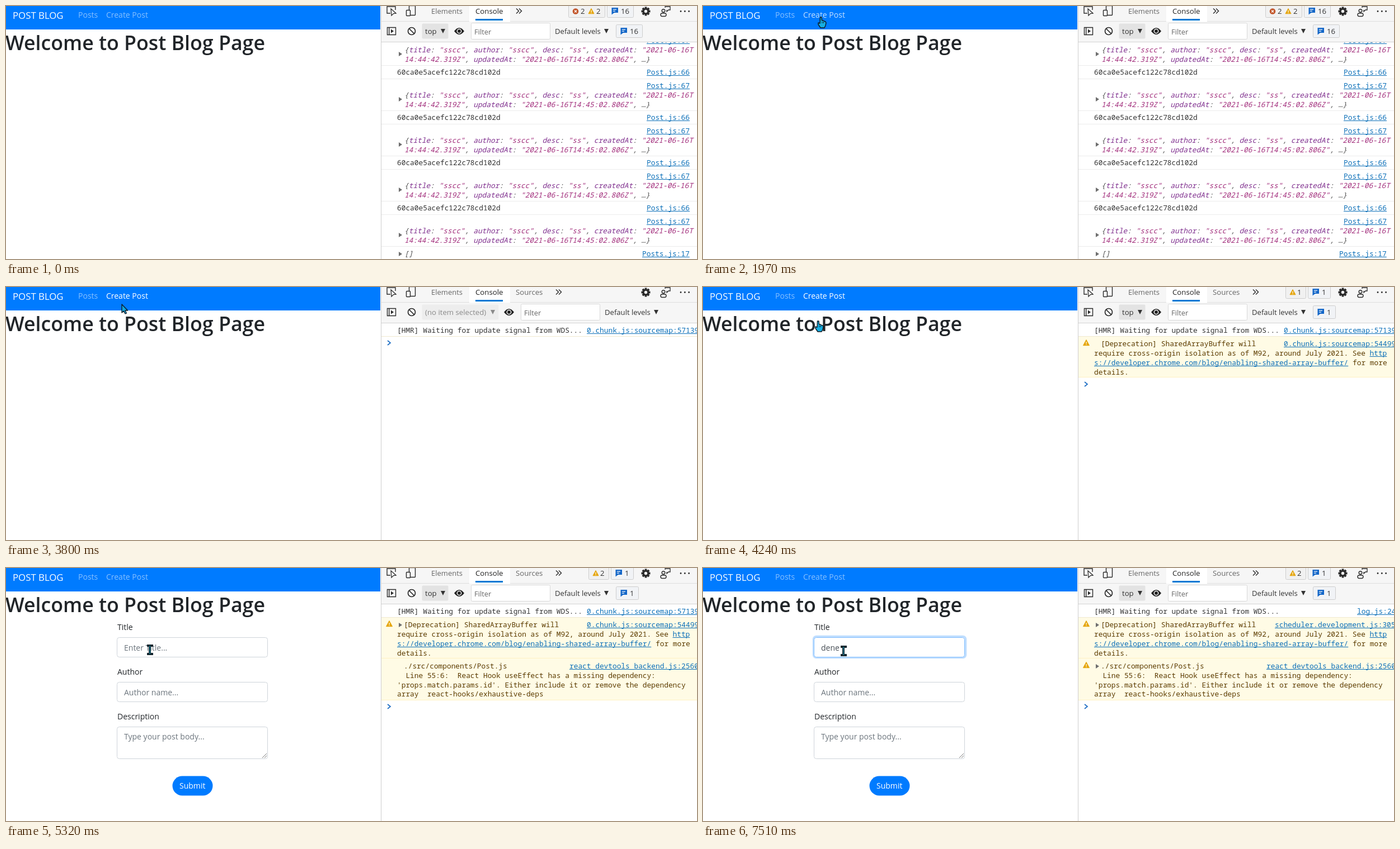
Recreate the animation shown at these times as an HTML page with a canvas. Size 1235x453 px, loop 8 s.

```html
<!DOCTYPE html>
<html lang="en">
<head>
<meta charset="utf-8">
<title>Post Blog</title>
<style>
html, body { margin: 0; width: 100%; height: 100%; overflow: hidden; background: #fff; }
canvas { display: block; width: 1235px; height: 453px; }
</style>
</head>
<body>
<canvas id="stage" width="1235" height="453"></canvas>
<script>
const ctx = document.getElementById('stage').getContext('2d');
const LOOP = 8000, TICK = 68;
const SANS = '"Open Sans", "Noto Sans", sans-serif';
const UI = '13.2px ' + SANS;
const PAGE = '14px ' + SANS;
const MONO = '12.83px "Noto Sans Mono", "DejaVu Sans Mono", monospace';
const CHAR = 7.7;
const LINK = '#0b6fb8', BROWN = '#5c3c00', BLUE = '#007bff';

// Pointer path: time, x, y
const PATH = [
  [200, 1018, 317], [480, 640, 210], [812, 104, 58], [948, 119, 33],
  [1084, 130, 27], [1220, 141, 18], [1490, 141, 18], [1968, 211, 20],
  [2990, 211, 18], [3670, 211, 19], [3800, 203, 42], [4030, 203, 44],
  [4240, 206, 64], [4440, 214, 74], [4710, 248, 104], [4980, 250, 112],
  [5320, 257, 148], [5400, 252, 148], [6840, 252, 148], [6980, 251, 148]
];

const clamp = v => Math.max(0, Math.min(1, v));

function pointer(time) {
  const t = 200 + Math.floor((time - 198) / TICK) * TICK;
  const i = PATH.findIndex(p => p[0] > t);
  if (i < 0) return PATH[PATH.length - 1].slice(1);
  if (i === 0) return PATH[0].slice(1);
  const [a, ax, ay] = PATH[i - 1], [b, bx, by] = PATH[i];
  const k = (t - a) / (b - a);
  return [Math.round(ax + (bx - ax) * k), Math.round(ay + (by - ay) * k)];
}

function text(s, x, y, color, font = UI) {
  ctx.font = font;
  ctx.fillStyle = color;
  ctx.fillText(s, x, y);
}

function rect(x, y, w, h, color) {
  ctx.fillStyle = color;
  ctx.fillRect(x, y, w, h);
}

function box(x, y, w, h, r, fill, border, line = 1) {
  ctx.beginPath();
  ctx.roundRect(x + .5, y + .5, w - 1, h - 1, r);
  if (fill) { ctx.fillStyle = fill; ctx.fill(); }
  if (border) { ctx.strokeStyle = border; ctx.lineWidth = line; ctx.stroke(); }
}

function poly(x, y, points, fill, stroke, width = 1, open = false) {
  ctx.beginPath();
  for (let i = 0; i < points.length; i += 2) ctx.lineTo(x + points[i], y + points[i + 1]);
  if (!open) ctx.closePath();
  if (fill) { ctx.fillStyle = fill; ctx.fill(); }
  if (stroke) { ctx.strokeStyle = stroke; ctx.lineWidth = width; ctx.stroke(); }
}

function circle(x, y, r, fill, stroke, width = 1.5) {
  ctx.beginPath();
  ctx.arc(x, y, r, 0, Math.PI * 2);
  if (fill) { ctx.fillStyle = fill; ctx.fill(); }
  if (stroke) { ctx.strokeStyle = stroke; ctx.lineWidth = width; ctx.stroke(); }
}

const down = (x, y, color) => poly(x, y, [-4, -4, 4, -4, 0, 4], color);
const expand = y => poly(702, y, [0, -4, 6, 0, 0, 4], '#6e6e6e');

function link(s, x, y) {
  text(s, x, y, LINK, MONO);
  rect(x, y + 1, s.length * CHAR, 1, LINK);
}

function warnIcon(x, y, r) {
  poly(x, y, [0, -r, r, r * .85, -r, r * .85], '#e5a50a', '#e5a50a');
  rect(x - .6, y - r * .35, 1.3, r * .6, '#fff');
  rect(x - .6, y + r * .42, 1.3, 1.2, '#fff');
}

function chatPill(x, y, h, count) {
  box(x, y, count > 9 ? 48 : 41, h, 2, '#f1f3f6', '#cdcdcd');
  const cy = y + h / 2 - 1;
  poly(x + 14, cy, [-5.5, -5, 6, -5, 6, 4, -1, 4, -5.5, 7.5], '#1467c8');
  rect(x + 11, cy - 2.5, 6, 1.2, '#fff');
  rect(x + 11, cy + .5, 4, 1.2, '#fff');
  text(count, x + 25, cy + 5.5, '#333');
}

function page(time, hover) {
  rect(0, 0, 670, 453, '#fff');
  rect(0, 0, 669, 42, BLUE);
  const focused = time >= 2440 && time < 4440;
  const shade = on => `rgba(255,255,255,${on ? .76 : .52})`;
  text('POST BLOG', 12, 23, '#fff', '16.8px ' + SANS);
  text('Posts', 129, 21, shade(hover === 1), PAGE);
  text('Create Post', 179, 21, focused ? '#fff' : shade(hover === 2), PAGE);
  text('Welcome to Post Blog Page', -1, 79, '#212529', '600 35.7px ' + SANS);
  if (time >= 4440) form(time);
}

function form(time) {
  const ink = '#212529', muted = '#6c757d', edge = '#ced4da';
  const typed = 'dene'.slice(0, [6230, 6370, 6840, 6980].filter(t => time >= t).length);
  const glow = clamp((time - 5670) / 210);
  ['Title', 'Author', 'Description'].forEach((s, i) => text(s, 199, 111 + i * 80, ink, PAGE));
  if (glow) box(197, 122, 273, 39, 5, null, `rgba(0,123,255,${.25 * glow})`, 3.5);
  const mix = (a, b) => Math.round(a + (b - a) * glow);
  box(198, 124, 270, 36, 4, '#fff', `rgb(${mix(206, 128)},${mix(212, 189)},${mix(218, 255)})`);
  box(198, 204, 270, 36, 4, '#fff', edge);
  box(198, 284, 270, 58, 4, '#fff', edge);
  text(typed || 'Enter Title...', 211, 148, typed ? '#495057' : muted, PAGE);
  const caretOn = (time >= 5670 && time < 6170) || (time >= 6230 && time < 7510);
  if (caretOn) {
    ctx.font = PAGE;
    rect(211 + Math.round(ctx.measureText(typed).width), 134, 1, 17, '#495057');
  }
  text('Author name...', 211, 228, muted, PAGE);
  text('Type your post body...', 211, 307, muted, PAGE);
  poly(458, 332, [0, 8, 8, 0], null, '#777', 1, true);
  poly(458, 332, [4, 8, 8, 4], null, '#777', 1, true);
  box(297, 372, 73, 36, 17.5, BLUE);
  text('Submit', 310, 395, '#fff', PAGE);
}

function tabIcons() {
  const ink = '#2b2b2b';
  poly(681, 1, [6, 12, 0, 12, 0, 0, 15, 0, 15, 6], null, ink, 1.4, true);
  poly(688, 5, [0, 0, 9, 8, 4.5, 8.5, 1, 12], '#fff', ink, 1.3);
  box(720, -1, 12, 18, 1, null, ink, 1.4);
  box(715, 7, 8, 11, 1, '#f6f6f6', ink, 1.4);
  for (let i = 0; i < 8; i++) {
    ctx.save();
    ctx.translate(1143.5, 9.5);
    ctx.rotate(i * Math.PI / 4);
    rect(-1.9, -8, 3.8, 4, ink);
    ctx.restore();
  }
  circle(1143.5, 9.5, 4.4, null, ink, 3.4);
  circle(1175, 8.5, 2.8, null, ink, 1.4);
  box(1169.5, 12.5, 11, 6.5, 2.7, null, ink, 1.4);
  poly(1178, 1, [0, 2, 0, 0, 9, 0, 9, 6, 6, 6, 3, 9, 3, 6], null, ink, 1.3, true);
  for (let i = 0; i < 3; i++) circle(1206 + i * 7.3, 9.5, 1.4, ink);
}

function more(x) {
  for (const dx of [0, 5]) poly(x + dx, 9, [0, -4.5, 4.5, 0, 0, 4.5], null, '#333', 1.5, true);
}

function tabs(time) {
  rect(671, 0, 564, 64, '#f6f6f6');
  rect(671, 27, 564, 1, '#dedede');
  rect(828, 0, 73, 28, '#fff');
  rect(839, 23, 49, 3, '#0078d4');
  text('Elements', 760, 14, '#666', '13px ' + SANS);
  text('Console', 839, 14, '#222');
  const reloaded = time >= 3670, warned = time >= 4170;
  if (reloaded) text('Sources', 911, 14, '#666');
  more(reloaded ? 983 : 912);
  if (!reloaded) {
    box(1005, -3, 66, 24, 2, '#f1f1f1', '#cdcdcd');
    circle(1018, 9.5, 5.3, '#c2562b');
    poly(1018, 9.5, [-2, -2, 2, 2], null, '#fff', 1.2, true);
    poly(1018, 9.5, [2, -2, -2, 2], null, '#fff', 1.2, true);
    text('2', 1027, 14, '#333');
    warnIcon(1046, 9.5, 5);
    text('2', 1055, 14, '#333');
    chatPill(1074, -3, 24, 16);
  } else if (warned) {
    box(1041, -3, 37, 24, 2, '#f1f1f1', '#cdcdcd');
    warnIcon(1054, 9.5, 5);
    text(time >= 5050 ? '2' : '1', 1062, 14, '#333');
    chatPill(1081, -3, 24, 1);
  }
  tabIcons();
}

function toolbar(time) {
  const ink = '#2b2b2b', empty = time >= 3000 && time < 4030;
  box(681, 38, 16, 14, 0, null, ink, 1.4);
  rect(684, 38, 1.4, 14, ink);
  poly(688, 45, [0, -3.5, 5, 0, 0, 3.5], ink);
  circle(725, 45, 6.5, null, ink, 1.7);
  poly(725, 45, [-4.5, -4.5, 4.5, 4.5], null, ink, 1.7, true);

  box(743, 31, empty ? 138 : 48, 28, 2, empty ? '#ededed' : '#e3e3e3');
  text(empty ? '(no item selected)' : 'top', 749, 50, empty ? '#8a8a8a' : '#333');
  down(empty ? 870 : 781, 45, empty ? '#8a8a8a' : '#333');

  const dx = empty ? 89 : 0;
  ctx.beginPath();
  ctx.moveTo(801 + dx, 45);
  ctx.quadraticCurveTo(810 + dx, 33, 819 + dx, 45);
  ctx.quadraticCurveTo(810 + dx, 57, 801 + dx, 45);
  ctx.fillStyle = '#222';
  ctx.fill();
  circle(810 + dx, 45, 3.7, null, '#fff', 1.4);

  box(831 + dx, 30, 142, 30, 2, '#fff', '#d8d8d8');
  text('Filter', 837 + dx, 51, '#666', '12.9px ' + SANS);
  text('Default levels', 981 + dx, 50, '#333', '13.1px ' + SANS);
  down(1073 + dx, 45, '#333');
  if (time < 3670) chatPill(1090 + dx, 33, 24, 16);
  else if (time >= 4170) chatPill(1090, 33, 24, 1);
  rect(671, 64, 564, 1, '#d4d4d4');
}

// Alternates plain and string colours at every quoted part.
function objectLine(s, y, inString) {
  const parts = s.match(/"[^"]*"?|\w+(?=:)|[^"\w]+|\w+/g);
  let x = 712;
  if (inString) {
    const end = s.indexOf('"') + 1;
    parts.splice(0, parts.length, s.slice(0, end), ...s.slice(end).match(/"[^"]*"?|\w+|[^"\w]+/g));
  }
  parts.forEach((part, i) => {
    const quoted = part[0] === '"' || (inString && i === 0);
    const color = quoted ? '#a22e7c' : /\w/.test(part) ? '#80318f' : '#555';
    text(part, x, y, color, 'italic ' + MONO);
    x += part.length * CHAR;
  });
}

function logs() {
  for (let i = 0; i < 5; i++) {
    const y = i * 81;
    link('Post.js:67', 1145, 66 + y);
    expand(86 + y);
    objectLine('{title: "sscc", author: "sscc", desc: "ss", createdAt: "2021-06-16T', 83 + y, false);
    objectLine('14:44:42.319Z", updatedAt: "2021-06-16T14:45:02.806Z", …}', 100 + y, true);
    rect(671, 106 + y, 564, 1, '#ececec');
    if (i === 4) break;
    text('60ca0e5acefc122c78cd102d', 699, 123 + y, '#333', MONO);
    link('Post.js:66', 1145, 123 + y);
    rect(671, 130 + y, 564, 1, '#ececec');
  }
  expand(444);
  text('[]', 712, 448, '#555', 'italic ' + MONO);
  link('Posts.js:17', 1137, 448);
}

function warnRow(y, h) {
  rect(671, y, 564, h, '#fffbe5');
  rect(671, y + h - 1, 564, 1, '#fff1c2');
}

function messages(time) {
  const mapped = time >= 6230;
  const brown = (s, x, y) => text(s, x, y, BROWN, MONO);
  let prompt = 76;
  if (time >= 3670) {
    text('[HMR] Waiting for update signal from WDS...', 699, 82, '#333', MONO);
    link(mapped ? 'log.js:24' : '0.chunk.js:sourcemap:57139', mapped ? 1169 : 1038, 82);
    rect(671, 88, 564, 1, '#f0e9d0');
    prompt = 100;
  }
  if (time >= 4170) {
    warnRow(89, 73);
    warnIcon(685, 100, 5.5);
    if (time >= 4440) expand(102);
    brown('[Deprecation] SharedArrayBuffer will', 711, 106);
    if (mapped) link('scheduler.development.js:305', 1022, 106);
    else link('0.chunk.js:sourcemap:54499', 1038, 106);
    brown('require cross-origin isolation as of M92, around July 2021. See', 699, 123);
    link('http', 1191.5, 123);
    link('s://developer.chrome.com/blog/enabling-shared-array-buffer/', 699, 140);
    brown('for more', 1161, 140);
    brown('details.', 699, 157);
    prompt = 174;
  }
  if (time >= 5050) {
    warnRow(162, 75);
    if (time >= 5400) { warnIcon(685, 174, 5.5); expand(176); }
    brown('./src/components/Post.js', 711, 180);
    link('react_devtools_backend.js:2560', 1007, 180);
    brown('  Line 55:6:  React Hook useEffect has a missing dependency:', 699, 197);
    brown("'props.match.params.id'. Either include it or remove the dependency", 699, 214);
    brown('array  react-hooks/exhaustive-deps', 699, 230);
    prompt = 248;
  }
  poly(682, prompt, [0, -4, 5, 0, 0, 4], null, '#1f6fc4', 1.7, true);
}

function devtools(time) {
  rect(670, 0, 565, 453, '#fff');
  ctx.save();
  ctx.beginPath();
  ctx.rect(671, 65, 564, 388);
  ctx.clip();
  if (time < 3000) logs(); else messages(time);
  ctx.restore();
  tabs(time);
  toolbar(time);
  rect(670, 0, 1, 453, '#cdcdcd');
}

function drawPointer(kind, x, y) {
  ctx.lineJoin = 'round';
  if (kind === 'arrow') {
    poly(x, y, [0, 0, 0, 15, 3.5, 12, 6, 17, 8.5, 16, 6, 11, 10.5, 11], '#11a5dc', '#101820', 1.3);
  } else if (kind === 'hand') {
    poly(x, y, [-1.5, 0, 1, 0, 1.5, 6, 4, 6, 6, 7.5, 8, 8, 9, 10, 8, 15, 6, 19, -1, 19, -5, 13, -5, 10, -2, 11],
      '#14aee2', '#101820', 1.4);
    for (const dx of [2, 4.5]) poly(x + dx, y, [0, 8, 0, 11], null, '#101820', .9, true);
  } else {
    rect(x - 5, y - 9, 11, 4, '#14262e');
    rect(x - 5, y + 6, 11, 4, '#14262e');
    rect(x - 2, y - 8, 4, 16, '#14262e');
    rect(x - .5, y - 7, 1.5, 15, '#167a91');
  }
  ctx.lineJoin = 'miter';
}

function draw(time) {
  const [x, y] = pointer(time);
  const onNav = time >= 1020 && time < 3000 && y < 32;
  const hover = !onNav ? 0 : x < 172 ? 1 : 2;
  page(time, hover);
  devtools(time);
  if (time < 200) return;
  const kind = hover || (time >= 4170 && time < 4440) ? 'hand'
    : time >= 4980 && y > 124 ? 'beam' : 'arrow';
  drawPointer(kind, x, y);
}

let start;
function frame(now) {
  start ??= now;
  draw((now - start) % LOOP);
  requestAnimationFrame(frame);
}
requestAnimationFrame(frame);
</script>
</body>
</html>
```
